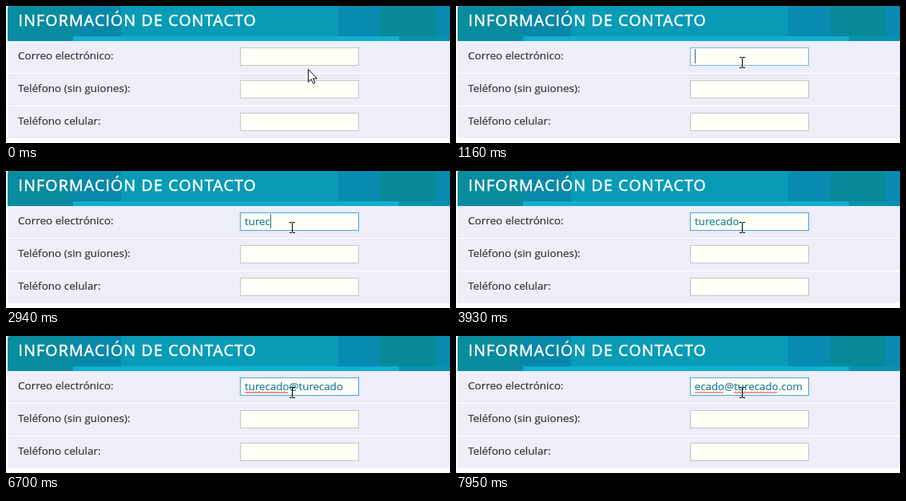
An HTML page that plays this animation: 556x172 px, repeating every 8000 ms.

```html
<!DOCTYPE html>
<html lang="es">
<head>
<meta charset="utf-8">
<title>Información de contacto</title>
<style>
  html, body { margin: 0; width: 556px; height: 172px; overflow: hidden; background: #fff; }
  svg { display: block; }
  text { font: 13.5px "Open Sans", "Noto Sans", sans-serif; fill: #333; stroke: #333; stroke-width: .2; white-space: pre; }
  #title { font-size: 19.5px; letter-spacing: 1.2px; fill: #fff; stroke: #fff; stroke-width: .5; }
  #mail { font-size: 13.333px; fill: #1b7d9c; stroke: #1b7d9c; }
  .field { fill: #fffff7; stroke: #c4c4ca; }
  .wave { fill: none; stroke: #e0302c; stroke-width: 1; }
</style>
</head>
<body>
<svg width="556" height="172" viewBox="0 0 556 172">
  <defs>
    <clipPath id="head"><path d="M2 44V3Q2 0 5 0H556V44Z"/></clipPath>
    <clipPath id="inner"><rect x="299" y="53" width="137" height="21"/></clipPath>
  </defs>
  <g id="banner" clip-path="url(#head)" shape-rendering="crispEdges"></g>
  <text id="title" x="15.5" y="25">INFORMACIÓN DE CONTACTO</text>
  <path fill="#eeeef8" d="M2 44H556V166H2Z"/>
  <path fill="#fff" d="M2 84H556V85H2ZM2 125H556V126H2Z"/>
  <text x="15" y="67">Correo electrónico:</text>
  <text x="15" y="108">Teléfono (sin guiones):</text>
  <text x="15" y="149">Teléfono celular:</text>
  <g id="glow" fill="none" stroke="#58b0e8">
    <rect x="291.5" y="50.5" width="152" height="26" rx="2" opacity=".04"/>
    <rect x="292.5" y="51.5" width="150" height="24" rx="1" opacity=".12"/>
  </g>
  <rect class="field" x="293.5" y="52.5" width="148" height="22"/>
  <rect class="field" x="293.5" y="93.5" width="148" height="22"/>
  <rect class="field" x="293.5" y="134.5" width="148" height="22"/>
  <rect id="focus" x="293.5" y="52.5" width="148" height="22" fill="none" stroke="#4fa9e0"/>
  <g clip-path="url(#inner)">
    <g id="line">
      <text id="mail" x="299" y="68"></text>
      <path id="wave1" class="wave"/>
      <path id="wave2" class="wave"/>
    </g>
  </g>
  <rect id="caret" y="54" width="1" height="18" fill="#2b6b82" shape-rendering="crispEdges"/>
  <path id="arrow" d="M.5 .5V16.5L4.2 13L6.8 18.5L9 17.5L6.5 12H11.5Z" fill="#fff" stroke="#111"/>
  <path id="beam" d="M-3 -6.5H0M1 -6.5H4M.5 -6V6M-3 6.5H0M1 6.5H4" fill="none" stroke="#000"/>
</svg>
<script>
const LOOP = 8000, LEFT = 299, RIGHT = 434;
const ADDRESS = 'turecado@turecado.com';
const KEYS = [2280, 2380, 2610, 2710, 2940, 3070, 3270, 3430, 4290, 4710, 4910,
  5110, 5210, 5410, 5570, 5800, 6200, 7000, 7190, 7300, 7420];
const BLINKS = [1750, 3930, 6700, 7950];
const BLOCKS = [
  [0, 0, 556, 44, '#089bb6'], [2, 0, 82, 38, '#078c9e'], [84, 0, 60, 38, '#0888a8'],
  [416, 0, 53, 38, '#088bb0'], [469, 0, 69, 38, '#07899a'], [538, 0, 18, 38, '#088bb0'],
  [2, 38, 82, 6, '#088ba0'], [84, 38, 408, 6, '#11aed0'], [492, 38, 64, 6, '#0892ad']
];

const $ = id => document.getElementById(id);
const show = (id, on) => $(id).setAttribute('visibility', on ? 'visible' : 'hidden');
const put = (id, x, y) => $(id).setAttribute('transform', `translate(${x} ${y})`);
const clamp = v => Math.max(0, Math.min(1, v));
const lastBefore = (list, t) => Math.max(0, ...list.filter(v => v <= t));

for (const [x, y, width, height, fill] of BLOCKS) {
  const block = document.createElementNS('http://www.w3.org/2000/svg', 'rect');
  for (const [k, v] of Object.entries({ x, y, width, height, fill })) block.setAttribute(k, v);
  $('banner').append(block);
}

function textWidth(text) {
  $('mail').textContent = text;
  return text ? $('mail').getComputedTextLength() : 0;
}

function drawWave(id, from, to) {
  let d = `M${from} 72`;
  for (let x = from + 2, up = true; x <= to; x += 2, up = !up) d += `L${x} ${up ? 70 : 72}`;
  $(id).setAttribute('d', d);
}

function drawPointer(t) {
  const step = t < 30 ? 0 : Math.min(9, Math.floor((t - 30) / 38.75) + 1);
  const x = Math.round(378 - 20 * step / 9), y = Math.round(79 - 8 * step / 9);
  const inField = y < 75;
  put('arrow', x, y);
  put('beam', x, y);
  show('arrow', !inField);
  show('beam', inField);
}

function drawFocus(t) {
  const p = t < 1100 ? 0 : clamp((Math.floor((t - 1100) / 30) + 1) / 6);
  $('focus').setAttribute('opacity', p);
  $('glow').setAttribute('opacity', p);
}

function drawEntry(t) {
  const width = textWidth(ADDRESS.slice(0, KEYS.filter(k => k <= t).length));
  const shift = Math.min(0, RIGHT - LEFT - width);
  put('line', shift, 0);
  show('wave1', t >= 4350);
  show('wave2', t >= 7030);
  $('caret').setAttribute('x', Math.round(LEFT + width + shift));
  show('caret', t >= 1130 && lastBefore(BLINKS, t) <= lastBefore(KEYS, t));
}

function render(t) {
  drawPointer(t);
  drawFocus(t);
  drawEntry(t);
}

const at = ADDRESS.indexOf('@'), dot = ADDRESS.indexOf('.');
drawWave('wave1', LEFT, LEFT + textWidth(ADDRESS.slice(0, at)));
drawWave('wave2', LEFT + textWidth(ADDRESS.slice(0, at + 1)), LEFT + textWidth(ADDRESS.slice(0, dot)));

const start = performance.now();
function tick() {
  render((performance.now() - start) % LOOP);
  requestAnimationFrame(tick);
}
tick();
</script>
</body>
</html>
```
